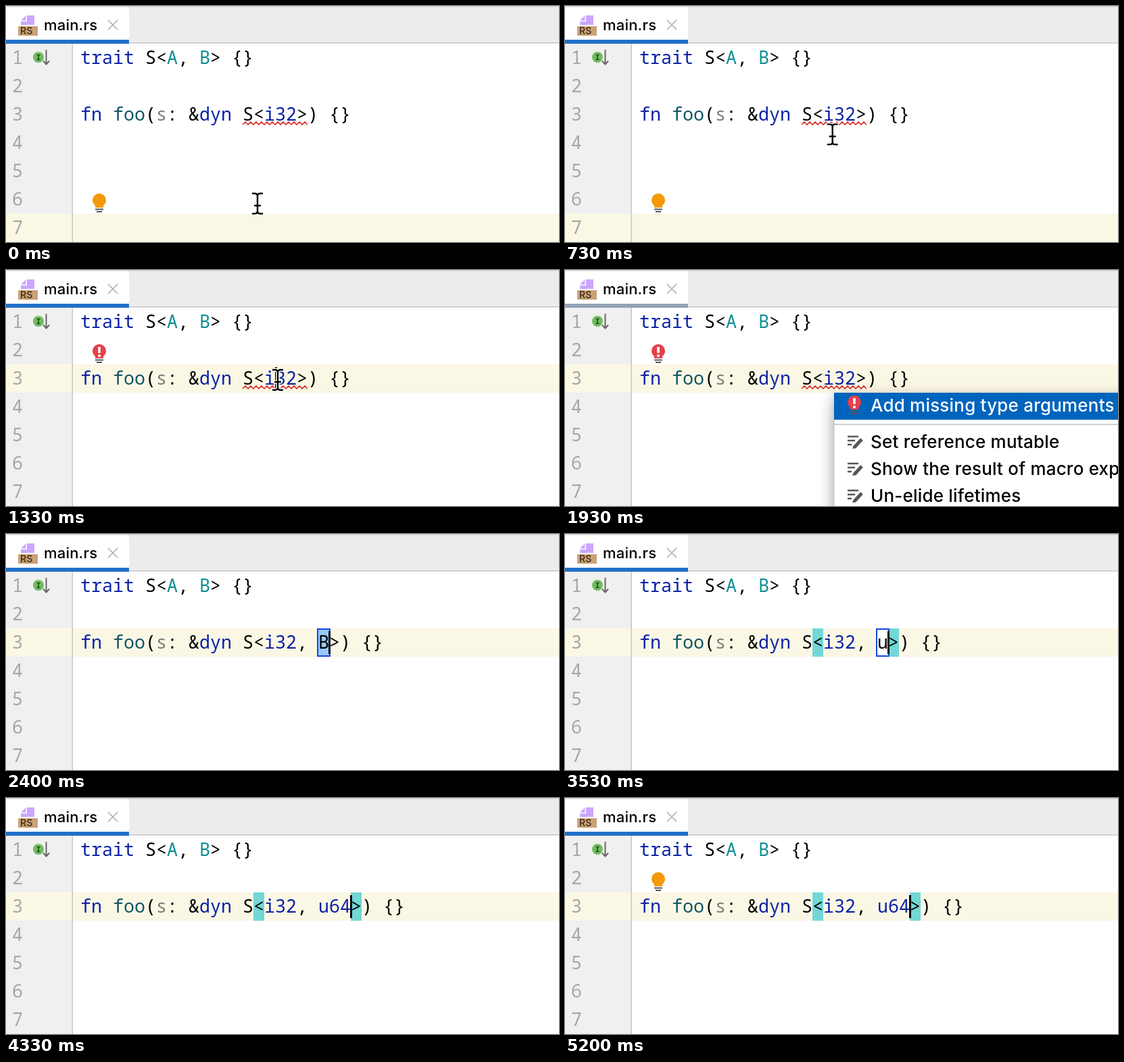
These frames come from a looping animation (818x350 px, 5540 ms). An HTML page:

```html
<!DOCTYPE html>
<html lang="en">
<head>
<meta charset="utf-8">
<style>
  html, body { margin: 0; width: 100%; height: 100%; overflow: hidden; background: #fff; }
  svg { display: block; }
  text { white-space: pre; font: 500 26px Inter, sans-serif; letter-spacing: .2px; }
  .code text { font: 500 26.667px "Noto Sans Mono", monospace; letter-spacing: 0; }
  .list text { font-weight: 700; }
  .hint text { font: 500 22px Inter, sans-serif; fill: #808080; }
  .kw { fill: #0b22a5; }
  .type { fill: #108e92; }
  .fn { fill: #0f5465; }
  .unused { fill: #7c7c7c; }
  .match { fill: #1a62b5; }
  .popup { filter: drop-shadow(0 8px 11px rgba(0, 0, 0, .4)); }
  .line { fill: none; stroke-width: 2; }
</style>
</head>
<body>
<svg width="818" height="350" viewBox="0 0 818 350">
  <defs>
    <g id="bulb">
      <path d="M0-11a10 10 0 0 1 10 10c0 4-2 6-4 8v3H-6V7c-2-2-4-4-4-8A10 10 0 0 1 0-11z" fill="currentColor"/>
      <path d="M-6 12.5H6M-4 16H4" stroke="#555" stroke-width="2"/>
    </g>
    <g id="alert" color="#e5404a">
      <use href="#bulb"/>
      <path d="M0-7V2M0 4.5V8" stroke="#fff" stroke-width="3.600"/>
    </g>
    <g id="pencil" class="line" stroke="#565656">
      <path d="M0-8H16M0-2H11M0 4H6" stroke-width="2.400"/>
      <path d="M10 8L21-4" style="stroke-width:5"/>
      <path d="M7 10l2-5 4 4z" fill="#565656" stroke="none"/>
    </g>
    <path id="beam" d="M-7-15h3q4 0 4 4V11q0 4-4 4h-3M7-15H4q-4 0-4 4M0 11q0 4 4 4H7M-4 3H4"/>
  </defs>

  <!-- editor -->
  <rect width="98" height="350" fill="#f0f0f0"/>
  <rect id="row" width="818" height="42" fill="#fbf7e5"/>
  <rect x="97.5" y="56" width="1.5" height="294" fill="#c6c6c6"/>

  <!-- tab bar -->
  <rect width="818" height="55" fill="#ececec"/>
  <rect y="54" width="818" height="1.5" fill="#c6c6c6"/>
  <rect width="182" height="50" fill="#fff"/>
  <rect id="underline" y="50" width="182" height="6"/>
  <rect width="818" height="1.5" fill="#cfcfcf"/>
  <path d="M31 14H42V28H22V23H31zM22 21.500L29.500 14V21.500z" fill="#cba6fb"/>
  <rect x="18" y="30" width="29" height="14" fill="#c9a377"/>
  <text x="21" y="42" style="font-size:14px;font-weight:600" fill="#4a3720">RS</text>
  <text x="56" y="36" style="font-size:22px">main.rs</text>
  <path d="M151 21l14 14M165 21l-14 14" class="line" stroke="#b0b0b0" style="stroke-width:1.600"/>

  <!-- gutter -->
  <g id="numbers" class="code" fill="#a6a6a6"></g>
  <circle cx="48" cy="76" r="8" fill="#6fbe5f"/>
  <path d="M45.500 72.500h5M48 72.500v7M45.500 79.500h5" class="line" stroke="#27451f" style="stroke-width:1.600"/>
  <path d="M59.500 65V86M55 81.500l4.500 5 4.500-5" class="line" stroke="#666"/>

  <!-- code -->
  <g id="braces" fill="#72d7d5"><rect x="366" y="140" width="16" height="42"/><rect id="close" y="140" width="16" height="42"/></g>
  <rect id="field" x="461" y="141" height="40" stroke="#1148e6" stroke-width="2"/>
  <g class="code">
    <text x="110" y="86"><tspan class="kw">trait</tspan> S&lt;<tspan class="type">A</tspan>, <tspan class="type">B</tspan>&gt; {}</text>
    <text x="110" y="170"><tspan class="kw">fn</tspan> <tspan class="fn">foo</tspan>(<tspan class="unused">s</tspan>: &amp;<tspan class="kw">dyn</tspan> S&lt;<tspan class="kw">i32</tspan><tspan id="comma"></tspan><tspan id="arg"></tspan>&gt;) {}</text>
  </g>
  <path id="squiggle" class="line" stroke="#d4302c" style="stroke-width:1.600"/>
  <rect id="caret" width="3" height="34"/>
  <use id="hintBulb" href="#bulb" color="#f59809"/>
  <use id="alertBulb" href="#alert" x="138" y="121"/>

  <!-- intention menu -->
  <g id="menu">
    <rect class="popup" x="398" y="182" width="470" height="240" fill="#fff"/>
    <path d="M398 182V350" stroke="#c4c4c4"/>
    <rect x="398" y="182" width="420" height="40" fill="#0064bd"/>
    <path d="M398 229H818" stroke="#d0d0d0" stroke-width="2"/>
    <use href="#alert" x="428" y="197"/>
    <text x="452" y="210" fill="#fff">Add missing type arguments</text>
    <g id="actions"></g>
  </g>

  <!-- completion lists -->
  <g id="listAll"></g>
  <g id="listFew"></g>

  <g id="mouse" class="line" stroke-linecap="round">
    <use href="#beam" stroke="#fff" style="stroke-width:5.500"/>
    <use href="#beam" stroke="#000" style="stroke-width:2.400"/>
  </g>
</svg>

<script>
const LOOP = 5540, CHAR = 16, LEFT = 110;
const $ = id => document.getElementById(id);
const set = (id, attrs) => { for (const k in attrs) $(id).setAttribute(k, attrs[k]); };
const show = (id, on) => { $(id).style.display = on ? '' : 'none'; };
const lineTop = n => 14 + 42 * n;

$('numbers').innerHTML = [1, 2, 3, 4, 5, 6, 7]
  .map(n => `<text x="9" y="${lineTop(n) + 30}">${n}</text>`).join('');

$('actions').innerHTML = ['Set reference mutable', 'Show the result of macro expansion', 'Un-elide lifetimes']
  .map((label, i) => `<use href="#pencil" x="418" y="${255 + 40 * i}"/><text x="452" y="${264 + 40 * i}">${label}</text>`).join('');

function completion(id, names, typed, height, extra = '') {
  const mark = name => [...name].map(c => typed.includes(c) ? `<tspan class="match">${c}</tspan>` : c).join('');
  $(id).innerHTML = `<rect class="popup" x="451" y="182" width="420" height="${height}" fill="#f4f4f4"/>
    <path d="M451.500 182V${182 + height}H818" fill="none" stroke="#c0c0c0"/>
    <rect x="452" y="182" width="366" height="40" fill="#d6d6d6"/>
    <g class="code list">` +
    names.map((name, i) => `<text x="462" y="${210 + 40 * i}">${mark(name)}</text>`).join('') + '</g>' + extra;
}
completion('listAll', ['u8', 'u16', 'u32', 'u64', 'u128'], 'u', 240);
completion('listFew', ['u64', 'u16'], 'u6', 124, `
  <g class="hint">
    <text x="462" y="292">Press</text>
    <text x="557" y="292">to insert,</text>
    <text x="687" y="292">to replace</text>
    <path d="M536 277h11v9H531M537 280l-6 6 6 6M660 284h13M668 279l5 5-5 5M677 278v12" class="line" stroke="#808080"/>
  </g>`);

function zigzag(from, to) {
  let d = `M${from} 176`;
  for (let x = from + 4, up = true; x <= to; x += 4, up = !up) d += `L${x} ${up ? 172 : 176}`;
  return d;
}

function render(t) {
  const within = (a, b) => t >= a && t < b;
  const clicked = t >= 870, inserted = t >= 2000;
  const arg = !inserted ? '' : t < 3470 ? 'B' : t < 3870 ? 'u' : t < 4070 ? 'u6' : 'u64';
  const menuOpen = within(1400, 2000);

  set('row', { y: lineTop(clicked ? 3 : 7) });
  set('underline', { fill: menuOpen ? '#93a2b6' : '#1f71c9' });

  $('comma').textContent = inserted ? ', ' : '';
  $('arg').textContent = arg;
  set('arg', { class: t >= 4130 ? 'kw' : '' });

  const col = !clicked ? 0 : !inserted ? 18 : 22 + arg.length;
  const caretX = LEFT + CHAR * col;
  set('caret', { x: inserted ? caretX - 1 : caretX, y: lineTop(clicked ? 3 : 7) + 4 });
  show('caret', within(200, 700) || within(870, 1400) ||
    inserted && !within(2800, 3070) && !within(4600, 4930));

  show('braces', t >= 3470);
  set('close', { x: caretX });
  show('field', within(2000, 4330));
  set('field', { width: CHAR * arg.length + 2, fill: t < 3470 ? '#99c9fc' : '#fff' });
  show('squiggle', t < 2330);
  set('squiggle', { d: zigzag(350, inserted ? 494 : 446) });

  show('hintBulb', !clicked || t >= 5130);
  set('hintBulb', { x: 138, y: clicked ? 121 : 289, opacity: within(5130, 5200) ? .6 : 1 });
  show('alertBulb', within(1330, 2000));
  show('menu', menuOpen);
  show('listAll', within(3670, 3930));
  show('listFew', within(3930, 4070));

  const p = Math.min(1, Math.max(0, (t - 400) / 470)), e = p * p * (3 - 2 * p);
  set('mouse', { transform: `translate(${372 + 30 * e} ${293 - 130 * e})` });
  show('mouse', t < 1400);
}

const start = performance.now();
(function tick() {
  render((performance.now() - start) % LOOP);
  requestAnimationFrame(tick);
})();
</script>
</body>
</html>
```
